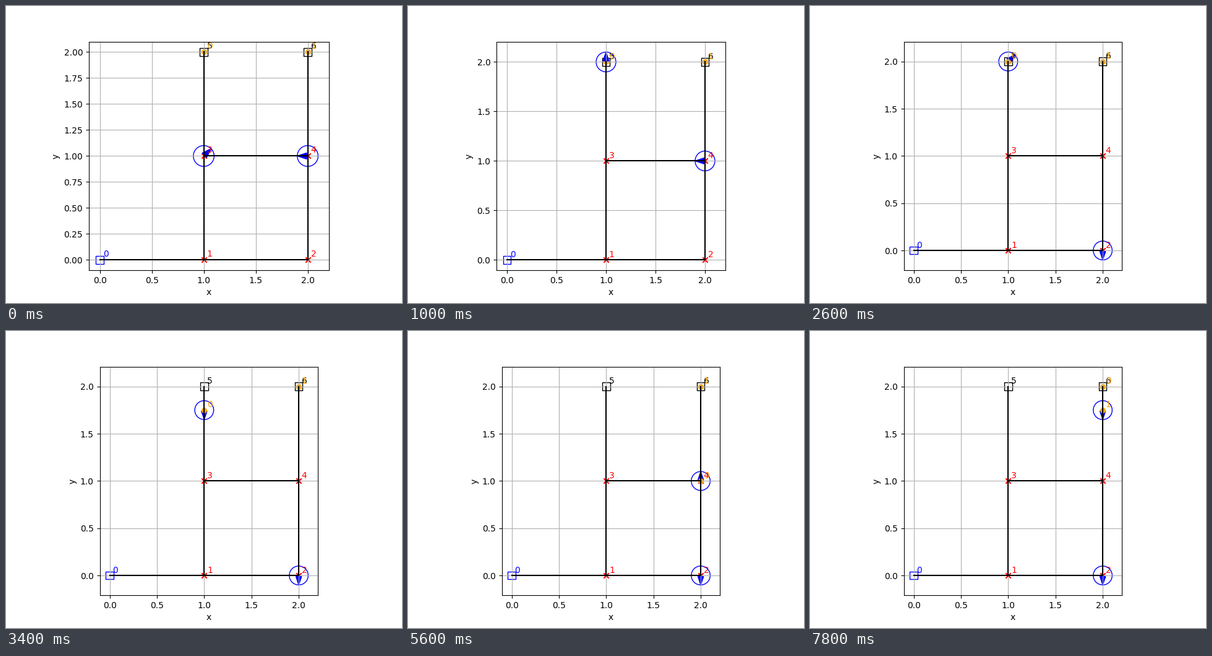
Animation, 640 px wide and 480 px high, one loop 8000 ms. Source, as a matplotlib script:

```python
import math

import matplotlib.pyplot as plt
from matplotlib.animation import FuncAnimation

STEP = 0.25      # distance driven per tick
TURN = 45        # degrees turned per tick
RADIUS = 0.1
OFFSET = 0.03    # label offset in data units

NODES = [(0, 0), (1, 0), (2, 0), (1, 1), (2, 1), (1, 2), (2, 2)]
EDGES = [(0, 1), (1, 2), (1, 3), (2, 4), (3, 4), (3, 5), (4, 6)]
CROSSINGS = (1, 2, 3, 4)


def simulate():
    """Return one (robots, packages, carried) state per tick."""
    robots = [(1, 1, 45), (2, 1, 180)]
    packages = [NODES[5], NODES[6]]
    carried = None
    states = []

    def tick():
        states.append((list(robots), list(packages), carried))

    def turn(r, goal):
        x, y, a = robots[r]
        diff = (goal - a + 180) % 360 - 180
        for _ in range(abs(diff) // TURN):
            a += TURN if diff > 0 else -TURN
            robots[r] = (x, y, a)
            tick()

    def drive(r, node):
        x, y, _ = robots[r]
        gx, gy = NODES[node]
        turn(r, round(math.degrees(math.atan2(gy - y, gx - x))))
        a = robots[r][2]
        n = round(math.hypot(gx - x, gy - y) / STEP)
        for i in range(1, n + 1):
            robots[r] = (x + (gx - x) * i / n, y + (gy - y) * i / n, a)
            if r == 0 and carried is not None:
                packages[carried] = robots[r][:2]
            tick()

    tick()
    drive(0, 5)
    carried = 0
    tick()
    drive(1, 2)
    for node in (3, 4, 6):
        drive(0, node)
    carried = None
    tick()
    carried = 1
    tick()
    drive(0, 4)
    return states[:40]


STATES = simulate()

fig, ax = plt.subplots(figsize=(6.4, 4.8), dpi=100)


def label(x, y, text, color):
    ax.text(x + OFFSET, y + OFFSET, str(text), color=color)


def draw_map():
    for a, b in EDGES:
        ax.plot(*zip(NODES[a], NODES[b]), color="k", lw=1.5)
    for i, (x, y) in enumerate(NODES):
        if i in CROSSINGS:
            color = "r"
            ax.scatter(x, y, marker="x", color=color)
        else:
            color = "b" if i == 0 else "k"
            ax.scatter(x, y, s=80, marker="s", facecolors="none",
                       edgecolors=color, linewidths=1)
        label(x, y, i, color)


def draw_robot(x, y, angle):
    a = math.radians(angle)
    ax.add_patch(plt.Circle((x, y), RADIUS, color="b", fill=False))
    ax.arrow(x, y, RADIUS * math.cos(a), RADIUS * math.sin(a), color="b",
             width=0.001, head_width=0.06, head_length=0.09,
             length_includes_head=True)


def draw_package(i, pos):
    ax.scatter(*pos, s=30, color="orange", linewidths=1)
    label(*pos, i, "orange")


def fit(k):
    """The view only ever grows, to hold every robot position so far."""
    past = [r for robots, _, _ in STATES[:k + 1] for r in robots]
    for axis, setter in ((0, ax.set_xlim), (1, ax.set_ylim)):
        lo = min(0, min(r[axis] for r in past) - RADIUS)
        hi = max(2, max(r[axis] for r in past) + RADIUS)
        pad = 0.05 * (hi - lo)
        setter(lo - pad, hi + pad)


def update(k):
    robots, packages, carried = STATES[k]
    ax.clear()
    draw_map()
    for i, pos in enumerate(packages):
        if i != carried:
            draw_package(i, pos)
    for robot in robots:
        draw_robot(*robot)
    if carried is not None:
        draw_package(carried, packages[carried])
    ax.set_aspect("equal", adjustable="box")
    fit(k)
    ax.grid(True)
    ax.set_xlabel("x")
    ax.set_ylabel("y")
    return []


anim = FuncAnimation(fig, update, frames=len(STATES), interval=200,
                     init_func=lambda: [], repeat=True, repeat_delay=0)
plt.show()
```
